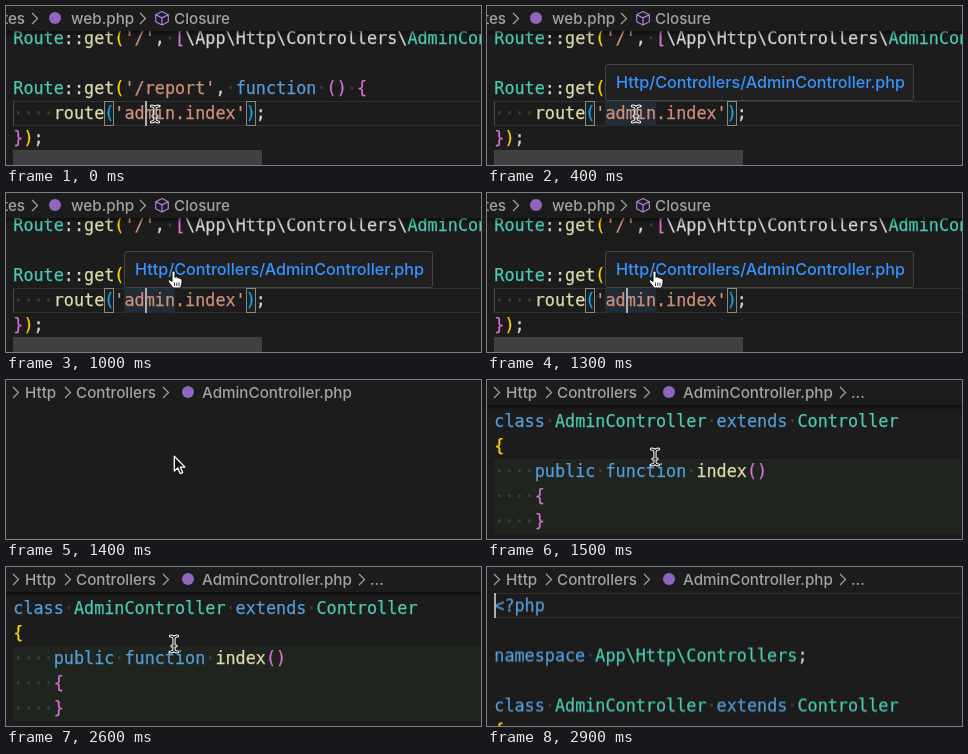
An HTML page that plays this animation: 475 px wide and 159 px high, repeating every 3 s.

```html
<!DOCTYPE html>
<html lang="en">
<head>
<meta charset="utf-8">
<title>Route hover link</title>
<style>
html, body { margin: 0; width: 100%; height: 100%; overflow: hidden; background: #1c1c1c; }
#stage { position: relative; width: 475px; height: 159px; overflow: hidden; background: #1c1c1c; }
#stage div, #stage pre, #stage svg { position: absolute; }
.view { inset: 0; }
.editor { left: 0; right: 0; top: 25px; bottom: 0; overflow: hidden; }
.shade { inset: 0 0 auto; height: 6px; box-shadow: #000 0 6px 6px -6px inset; }
pre { margin: 0; left: 7.3px; font: 16.8px/25px "DejaVu Sans Mono", monospace; color: #d4d4d4; -webkit-text-stroke: .25px; }
.k { color: #569cd6; } .t { color: #4ec9b0; } .f { color: #dcdcaa; } .s { color: #ce9178; }
.g { color: #ffd700; } .o { color: #da70d6; } .b { color: #179fff; } .w { color: #3f3f3f; }
.crumb { top: 0; white-space: pre; font: 500 15.2px/25px Inter, sans-serif; color: #a3a3a3; }
.line { left: 7px; width: 480px; height: 23px; border: 1px solid #303030; border-left-color: #4a4a4a; }
.match { top: 70px; width: 8px; height: 23px; border: 1px solid #888; background: rgba(0, 100, 0, .1); }
.caret { width: 2px; height: 25px; background: #aeafad; }
.word { left: 118px; top: 70px; width: 51px; height: 25px; background: #222c37; }
.bar { left: 7px; top: 144px; width: 249px; height: 15px; background: #414141; }
.tip { left: 118px; top: 58px; width: 307px; height: 35px; border: 1px solid #454545; border-radius: 3px; background: #202021;
  font: 500 16.15px/34px Inter, sans-serif; color: #3794ff; white-space: pre; text-indent: 10px; }
.range { left: 7px; right: 0; top: 151px; height: 75px; background: #20241f; }
.mouse { left: 0; top: 0; animation: move 3s infinite; }
.mouse svg { overflow: visible; width: 1px; height: 1px; }

.web, .file, .code, .scroll, .deep, .start, .hover, .blink, .beam, .hand, .arrow {
  animation-duration: 3s; animation-timing-function: step-end; animation-iteration-count: infinite;
}
.web { animation-name: web; }       .file { animation-name: file; }
.code { animation-name: code; }     .scroll { animation-name: scroll; }
.deep { animation-name: deep; }     .start { animation-name: start; }
.hover { animation-name: hover; }   .blink { animation-name: blink; }
.beam { animation-name: beam; }     .hand { animation-name: hand; }
.arrow { animation-name: arrow; }
@keyframes web { 0% { opacity: 1 } 46.66%, 100% { opacity: 0 } }
@keyframes file { 0% { opacity: 0 } 46.66%, 100% { opacity: 1 } }
@keyframes code { 0% { opacity: 0 } 49.99%, 100% { opacity: 1 } }
@keyframes scroll { 0% { transform: translateY(-97.5px) } 93.33%, 100% { transform: none } }
@keyframes deep { 0% { opacity: 1 } 93.33%, 100% { opacity: 0 } }
@keyframes start { 0% { opacity: 0 } 93.33%, 100% { opacity: 1 } }
@keyframes hover { 0% { opacity: 0 } 6.66%, 100% { opacity: 1 } }
@keyframes blink { 0% { opacity: 1 } 10% { opacity: 0 } 26.66%, 100% { opacity: 1 } }
@keyframes beam { 0% { opacity: 1 } 23.33% { opacity: 0 } 49.99% { opacity: 1 } 93.33%, 100% { opacity: 0 } }
@keyframes hand { 0% { opacity: 0 } 23.33% { opacity: 1 } 46.66%, 100% { opacity: 0 } }
@keyframes arrow { 0% { opacity: 0 } 46.66% { opacity: 1 } 49.99%, 100% { opacity: 0 } }
@keyframes move {
  0%, 16.66% { transform: translate(149px, 108px); animation-timing-function: steps(4); }
  29.99%, 100% { transform: translate(168px, 77px); }
}
</style>
</head>
<body>
<div id="stage">
  <div class="view web">
    <div class="editor">
      <div class="line" style="top:69.6px"></div>
      <div class="word hover"></div>
      <div class="match" style="left:98px"></div>
      <div class="match" style="left:240px"></div>
      <pre style="top:-5.3px"><span class="t">Route</span>::<span class="f">get</span><span class="g">(</span><span class="s">'/'</span>,<span class="w">·</span><span class="o">[</span>\App\Http\Controllers\<span class="t">AdminController</span>

<span class="t">Route</span>::<span class="f">get</span><span class="g">(</span><span class="s">'/report'</span>,<span class="w">·</span><span class="k">function</span><span class="w">·</span><span class="o">()</span><span class="w">·</span><span class="o">{</span>
<span class="w">····</span><span class="f">route</span><span class="b">(</span><span class="s">'admin.index'</span><span class="b">)</span>;
<span class="o">}</span><span class="g">)</span>;</pre>
      <div class="caret blink" style="left:139px;top:70px"></div>
      <div class="shade"></div>
    </div>
    <div class="bar"></div>
    <div class="crumb" style="right:456px">routes</div>
    <div class="crumb" style="left:65px">web.php</div>
    <div class="crumb" style="left:168px">Closure</div>
    <svg width="475" height="25" fill="none" stroke="#a3a3a3" stroke-width="1.2">
      <path d="M26 7l5.5 5.5-5.5 5.5M134 7l5.5 5.5-5.5 5.5"/>
      <circle cx="49" cy="12" r="6" fill="#8f65bd" stroke="none"/>
      <path d="M156 5.5l6.3 3.2v7L156 19l-6.3-3.3v-7zM149.7 8.7l6.3 3.2 6.3-3.2M156 11.9V19" stroke="#b180d7" stroke-linejoin="round"/>
    </svg>
    <div class="tip hover">Http/Controllers/AdminController.php</div>
  </div>

  <div class="view file">
    <div class="editor code">
      <div class="view scroll">
        <div class="range deep"></div>
        <div class="line start" style="top:1px"></div>
        <pre style="top:1px"><span class="k">&lt;?php</span>

<span class="k">namespace</span><span class="w">·</span><span class="t">App\Http\Controllers</span>;

<span class="k">class</span><span class="w">·</span><span class="t">AdminController</span><span class="w">·</span><span class="k">extends</span><span class="w">·</span><span class="t">Controller</span>
<span class="g">{</span>
<span class="w">····</span><span class="k">public</span><span class="w">·</span><span class="k">function</span><span class="w">·</span><span class="f">index</span><span class="o">()</span>
<span class="w">····</span><span class="o">{</span>
<span class="w">····</span><span class="o">}</span></pre>
        <div class="caret start" style="left:7px;top:1px"></div>
      </div>
      <div class="shade deep"></div>
    </div>
    <div class="crumb" style="left:19px">Http</div>
    <div class="crumb" style="left:70px">Controllers</div>
    <div class="crumb" style="left:196px">AdminController.php</div>
    <div class="crumb code" style="left:364px">...</div>
    <svg width="475" height="25" fill="none" stroke="#a3a3a3" stroke-width="1.2">
      <path d="M7 7l5.5 5.5L7 18M59 7l5.5 5.5L59 18M157 7l5.5 5.5-5.5 5.5"/>
      <path class="code" d="M353 7l5.5 5.5-5.5 5.5"/>
      <circle cx="182" cy="12" r="6" fill="#8f65bd" stroke="none"/>
    </svg>
  </div>

  <div class="mouse">
    <svg class="beam" fill="none" stroke-linecap="round">
      <path id="ibeam" d="M-3.5-8Q-.5-8 0-5.5Q.5-8 3.5-8M0-5.5V5.5M-3.5 8Q-.5 8 0 5.5Q.5 8 3.5 8M-2 2H2" stroke="#fff" stroke-width="3.2"/>
      <path d="M-3.5-8Q-.5-8 0-5.5Q.5-8 3.5-8M0-5.5V5.5M-3.5 8Q-.5 8 0 5.5Q.5 8 3.5 8M-2 2H2" stroke="#111" stroke-width="1.1"/>
    </svg>
    <svg class="hand" stroke="#111" stroke-linejoin="round">
      <path d="M-2 2.5Q-2 1-.6 1T1 2.5V7.5Q1.3 6.5 2.5 6.8T3.7 8Q5 7 6 8.5Q7.7 8 8 10V13Q7.5 15 6.5 18H-1Q-3 15-5.5 12Q-6.5 10-4.6 9.8L-2 11.5Z" fill="#fff"/>
      <path d="M.5 12.5V16M2.8 12.5V16M5 12.5V16" stroke-width=".8"/>
    </svg>
    <svg class="arrow">
      <path d="M.3-.8V14L3.8 11L6.2 16.6L8.6 15.6L6.3 10.1H11Z" fill="#111" stroke="#fff" stroke-width="1.3" stroke-linejoin="round"/>
    </svg>
  </div>
</div>
</body>
</html>
```
